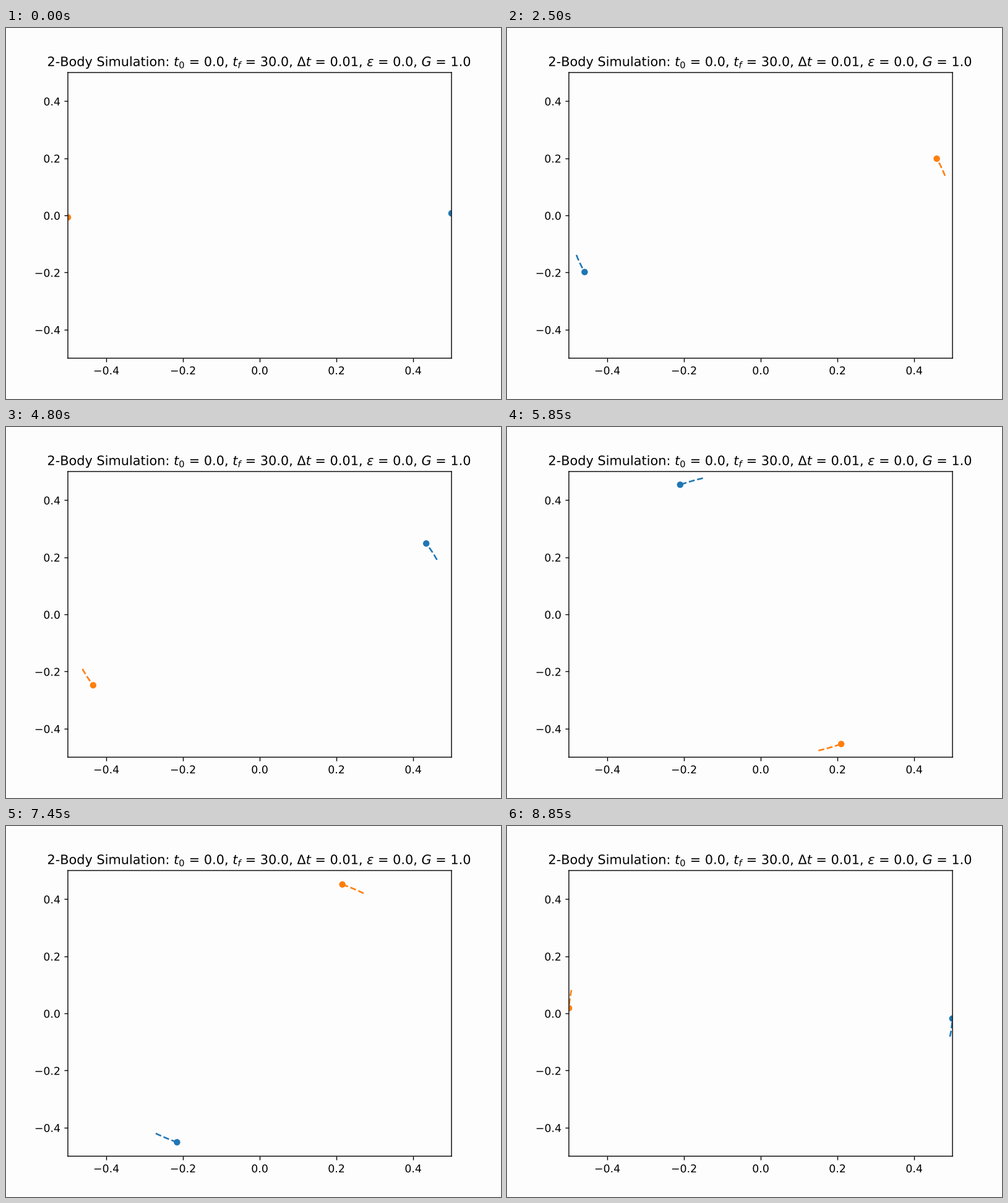
Write a matplotlib script that moves like this. It is 800 by 600 pixels and loops after 8.9 s.

```python
import matplotlib.pyplot as plt
import numpy as np
from matplotlib.animation import FuncAnimation
from matplotlib.patheffects import Normal

DT = 0.01           # simulation step
STEPS = 5           # steps advanced per drawn frame
TRAIL = 10          # points kept in each trail
RADIUS = 0.5
OMEGA = np.sqrt(2)  # two unit masses at unit separation, G = 1
FRAMES = 178
BACKGROUND = "#fefdfe"

# Draw text and markers as outlines, without rounding to whole pixels.
plt.rcParams.update({"path.effects": [Normal()], "path.snap": False})

fig, ax = plt.subplots(figsize=(6.4, 4.8), dpi=125, facecolor=BACKGROUND)
ax.set_facecolor(BACKGROUND)
ax.set(xlim=(-0.5, 0.5), ylim=(-0.5, 0.5))
ax.set_title(
    r"2-Body Simulation: $t_0$ = 0.0, $t_f$ = 30.0, $\Delta t$ = 0.01, "
    r"$\varepsilon$ = 0.0, $G$ = 1.0"
)


def make_body(color):
    trail, = ax.plot([], [], "--", color=color)
    dot, = ax.plot([], [], "o", color=color, markersize=5)
    return trail, dot


bodies = [make_body("tab:blue"), make_body("tab:orange")]


def update(frame):
    step = 1 + STEPS * frame
    steps = np.arange(max(0, step - TRAIL + 1), step + 1)
    angle = OMEGA * DT * steps
    x, y = RADIUS * np.cos(angle), RADIUS * np.sin(angle)
    for (trail, dot), side in zip(bodies, (1, -1)):
        trail.set_data(side * x, side * y)
        dot.set_data(side * x[-1:], side * y[-1:])
    return [artist for body in bodies for artist in body]


anim = FuncAnimation(fig, update, frames=FRAMES, interval=50,
                     repeat=True, repeat_delay=0)
plt.show()
```
